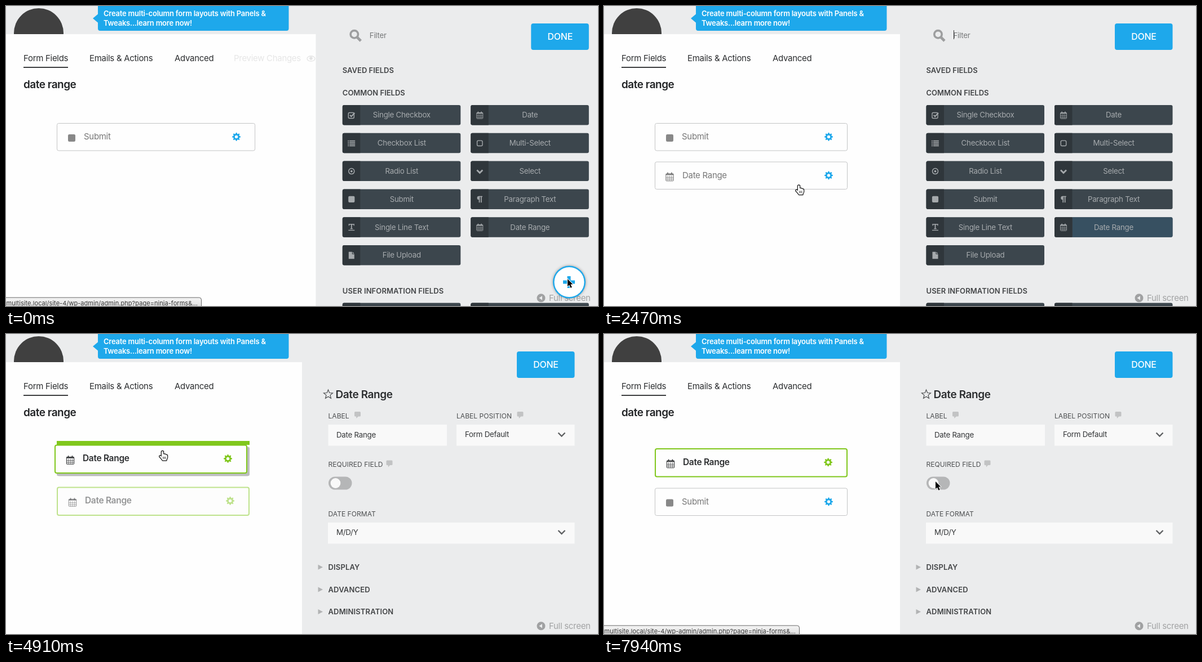
Recreate the animation shown at these times as an HTML page with a canvas. Size 1050 by 533 pixels, loop 8 s.

```html
<!DOCTYPE html>
<html lang="en">
<head>
<meta charset="utf-8">
<title>Form builder</title>
<style>
html, body { margin: 0; width: 100%; height: 100%; overflow: hidden; background: #ebeced; }
canvas { display: block; width: 1050px; height: 533px; }
</style>
</head>
<body>
<canvas id="stage"></canvas>
<script>
const W = 1050, H = 533, LOOP = 8000;
const BLUE = '#1ea8eb', GREEN = '#80c71c', BG = '#ebeced', PAPER = '#fefefe', DARK = '#424446';
const FONT = 'Inter, Roboto, "Liberation Sans", sans-serif';
const canvas = document.getElementById('stage');
const ctx = canvas.getContext('2d');
const ratio = window.devicePixelRatio || 1;
canvas.width = W * ratio;
canvas.height = H * ratio;

// start, end, number of steps, x, y
const MOVES = [
  [470, 470, 1, 961, 403],
  [620, 970, 4, 850, 399],
  [1150, 1230, 2, 846, 397],
  [1590, 2260, 8, 345.5, 319],
  [2730, 3020, 4, 329, 312],
  [3800, 4010, 3, 280, 309],
  [4550, 4910, 5, 277.5, 208.5],
  [5000, 5120, 2, 282, 187],
  [5660, 5660, 1, 279, 190],
  [6320, 6770, 6, 394, 240],
  [6950, 7130, 3, 394, 233],
  [7850, 7940, 2, 588, 262]
];
const BUTTONS = [
  ['Single Checkbox', 'check', 'Date', 'calendar'],
  ['Checkbox List', 'list', 'Multi-Select', 'outline'],
  ['Radio List', 'radio', 'Select', 'chevron'],
  ['Submit', 'square', 'Paragraph Text', 'para'],
  ['Single Line Text', 'type', 'Date Range', 'calendar'],
  ['File Upload', 'file']
];
const HAND = new Path2D('M-1.6 9V1Q-1.6-.6 0-.6Q1.6-.6 1.6 1V5Q2.8 4.2 4.1 5.4Q5.6 4.8 6.4 6.2Q8.6 5.9 8.6 8V11' +
  'Q8.4 13 7 14.6V16H.2Q-1 14-2.5 12.3L-5 9.6Q-5.6 8-4.1 7.8Q-2.8 8-1.6 9.6Z');
const ARROW = new Path2D('M0 0V13.2L3 10.5L5.4 15.8L7.8 14.8L5.4 9.6L9.4 9.4Z');

function text(str, x, y, size, color, weight = 400, gap = 0, align = 'left') {
  ctx.font = `${weight} ${size}px ${FONT}`;
  ctx.letterSpacing = gap + 'px';
  ctx.textAlign = align;
  ctx.fillStyle = color;
  ctx.fillText(str, x, y);
}
const body = (str, x, y, color, weight, size = 15) => text(str, x, y, size, color, weight, -.3);
const small = (str, x, y, color, align) => text(str, x, y, 13.3, color, 400, -.25, align);

function rect(x, y, w, h, color) {
  ctx.fillStyle = color;
  ctx.fillRect(x, y, w, h);
}
function round(x, y, w, h, r, fill, stroke, line = 1) {
  ctx.beginPath();
  ctx.roundRect(x, y, w, h, r);
  paint(fill, stroke, line);
}
function disc(x, y, r, fill, stroke, line = 1) {
  ctx.beginPath();
  ctx.arc(x, y, r, 0, Math.PI * 2);
  paint(fill, stroke, line);
}
function paint(fill, stroke, line) {
  if (fill) { ctx.fillStyle = fill; ctx.fill(); }
  if (stroke) { ctx.strokeStyle = stroke; ctx.lineWidth = line; ctx.stroke(); }
}
function poly(pts, fill, stroke, line, open) {
  ctx.beginPath();
  pts.forEach(([x, y], i) => i ? ctx.lineTo(x, y) : ctx.moveTo(x, y));
  if (!open) ctx.closePath();
  paint(fill, stroke, line);
}
function at(x, y, draw) {
  ctx.save();
  ctx.translate(x, y);
  draw();
  ctx.restore();
}
function fade(alpha, draw) {
  ctx.save();
  ctx.globalAlpha = alpha;
  draw();
  ctx.restore();
}

const ICONS = {
  check(c) {
    round(-5.5, -4.5, 10, 10, 2, null, c, 1.4);
    poly([[-2.8, -.2], [-.4, 2.2], [5.6, -4]], null, c, 2, true);
  },
  calendar(c) {
    round(-5.5, -4.5, 11, 10.5, 1, null, c, .9);
    rect(-5.5, -4.5, 11, 1.8, c);
    for (let i = -1; i < 2; i++) rect(i * 2.75 - .3, -2, .6, 8, c);
    for (let i = 0; i < 2; i++) rect(-5.5, .4 + i * 2.7, 11, .6, c);
    rect(-3.6, -6.5, 1.5, 3, c);
    rect(2.1, -6.5, 1.5, 3, c);
  },
  list(c) {
    for (let i = 0; i < 4; i++) {
      rect(-6.5, -5 + i * 2.9, 1.8, 1.7, c);
      rect(-3.6, -5 + i * 2.9, 10, 1.7, c);
    }
  },
  outline(c) { round(-4.7, -4.7, 9.4, 9.4, 2, null, c, 1.4); },
  radio(c) {
    disc(0, 0, 5, null, c, 1.5);
    disc(0, 0, 1.9, c);
  },
  chevron(c) { poly([[-5, -2], [0, 3], [5, -2]], null, c, 2.8, true); },
  square(c) { round(-5.6, -5.6, 11.2, 11.2, 2, c); },
  para(c) {
    ctx.beginPath();
    ctx.arc(-1.5, -2.4, 3.2, Math.PI / 2, Math.PI * 1.5);
    ctx.closePath();
    paint(c);
    rect(-1.6, -5.6, 6.4, 1.4, c);
    rect(-1.6, -5.6, 1.7, 11.4, c);
    rect(1.8, -5.6, 1.7, 11.4, c);
  },
  type(c) {
    rect(-5, -6, 10, 1.5, c);
    rect(-5, -6, 1.2, 3.2, c);
    rect(3.8, -6, 1.2, 3.2, c);
    rect(-.9, -6, 1.8, 9, c);
    rect(-2.4, 2, 4.8, 1.1, c);
    rect(-5.5, 4.6, 11, 1.3, c);
  },
  file(c) {
    poly([[-5, -6.3], [1, -6.3], [1, -2], [5, -2], [5, 6.3], [-5, 6.3]], c);
    poly([[2, -6.3], [5, -3], [2, -3]], c);
  }
};
function icon(name, x, y, color, scale = 1) {
  at(x, y, () => { ctx.scale(scale, scale); ICONS[name](color); });
}

// One path, so that it stays even when drawn half transparent.
function gear(x, y, color) {
  ctx.beginPath();
  for (let i = 0; i < 32; i++) {
    const r = i % 4 < 2 ? 7.5 : 5.5;
    const a = (i - .5) * Math.PI / 16;
    ctx.lineTo(x + r * Math.cos(a), y + r * Math.sin(a));
  }
  ctx.closePath();
  ctx.moveTo(x + 2.7, y);
  ctx.arc(x, y, 2.7, 0, Math.PI * 2);
  ctx.fillStyle = color;
  ctx.fill('evenodd');
}

function header() {
  ctx.save();
  ctx.beginPath();
  ctx.rect(0, 0, W, 50);
  ctx.clip();
  disc(58, 48, 44, '#404040');
  ctx.restore();
  round(163, -6, 338.5, 50, 4, BLUE);
  poly([[154, 22], [163.5, 14], [163.5, 30]], BLUE);
  text('Create multi-column form layouts with Panels &', 173, 18, 13, '#fff', 600, -.22);
  text('Tweaks...learn more now!', 173, 35, 13, '#fff', 600, -.22);
}

function tabs(t) {
  body('Form Fields', 31, 98, '#2c2e30');
  body('Emails & Actions', 148, 98, '#2c2e30');
  body('Advanced', 299, 98, '#2c2e30');
  rect(31, 108, 79, 2, '#3c3e40');
  if (t < 120) {
    body('Preview Changes', 404, 98, '#e6e6e6');
    ctx.beginPath();
    ctx.ellipse(541, 93.5, 7, 4.5, 0, 0, Math.PI * 2);
    paint(null, '#e3e3e3', 1.3);
    disc(541, 93, 2.8, '#e3e3e3');
  }
  text('date range', 31, 146, 19, '#222426', 600, -.5);
}

function field(name, y, right, opt = {}) {
  const { x = 90, on = false, shadow = false } = opt;
  const w = right - 90;
  const h = on ? 51.5 : 49.5;
  if (shadow) round(x + 4, y + 4, w, h, 3, '#bcbdbe');
  const line = on ? 2 : 1;
  round(x + line / 2, y + line / 2, w - line, h - line, 3, PAPER, on ? GREEN : '#c3c4c5', line);
  const dx = on ? 1.5 : 0, dy = on ? .5 : 0;
  if (name === 'Submit') icon('square', x + 26.5, y + 26.5, '#888', 1.16);
  else icon('calendar', x + 26.5 + dx, y + 27 + dy, on ? '#3a3c3e' : '#777', 1.2);
  const tx = x + (name === 'Submit' ? 48 : 49) + dx * .6;
  body(name, tx, y + 29.2 + dy, on ? '#2b2d2f' : '#777', on ? 600 : 400, on ? 15.5 : 15);
  gear(x + w - 33.5 - dx * .6, y + 24.4 + dy, on ? GREEN : BLUE);
}

function fields(t, right, hot) {
  const picked = { on: true };
  if (t < 3470) {
    field('Submit', 208, right);
    if (t >= 1690) field('Date Range', 276.5, right);
  } else if (t < 4550) {
    field('Submit', 208, right);
    field('Date Range', 276.5, right, picked);
  } else if (t < 5660) {
    const above = hot.y < 235;
    rect(90, above ? 190 : 334, 342, 7, GREEN);
    field('Submit', above ? 203 : 208, right);
    fade(.5, () => field('Date Range', above ? 271.5 : 276.5, right, picked));
    field('Date Range', hot.y - 12, right, { on: true, shadow: true, x: hot.x - 191.5 });
  } else {
    field('Date Range', 203, right, picked);
    field('Submit', 273.5, right);
  }
}

function done() {
  round(906, 31, 102.5, 47, 4, BLUE);
  text('DONE', 957.5, 60, 16, '#fff', 500, -.3, 'center');
}

function glow(t) {
  if (t < 1410 || t >= 3020) return 0;
  return t < 2470 ? 1 - .15 * (t - 1410) / 1060 : t < 2730 ? .8 : .25;
}

function button(x, y, label, glyph, lit) {
  round(x, y, 209.5, 35.5, 3, '#3c464d');
  if (lit) fade(lit, () => round(x + 32, y, 177.5, 35.5, [0, 3, 3, 0], '#365367'));
  round(x, y, 31.5, 35.5, [3, 0, 0, 3], '#2f363b');
  if (!label) return;
  icon(glyph, x + 16, y + 18, '#a5a9ac');
  small(label, x + 105, y + 22.3, '#a7abae', 'center');
}

function picker(t) {
  disc(592.5, 50.3, 6.7, null, '#9d9e9f', 3.6);
  poly([[597.5, 55.5], [604, 62]], null, '#9d9e9f', 4.6, true);
  small('Filter', 619.5, 56.5, '#77797a');
  const caret = t >= 120 && t < 620 || t >= 1150 && t < 1640 || t >= 2140 && t < 2730 || t >= 3200;
  if (caret) rect(620, 43, 1, 16, '#333');
  text('SAVED FIELDS', 571.5, 119.3, 13, DARK, 600);
  text('COMMON FIELDS', 571.5, 159, 13, DARK, 600);
  text('USER INFORMATION FIELDS', 571.5, 510.5, 13, DARK, 600, .1);
  BUTTONS.forEach(([a, ai, b, bi], i) => {
    const y = 176 + i * 49.8;
    button(571.5, y, a, ai, 0);
    if (b) button(799, y, b, bi, i === 4 ? glow(t) : 0);
  });
  button(571.5, 527.5);
  button(799, 527.5);
}

function hint(x, y) {
  round(x, y, 11, 8.5, 1.5, '#c2c3c4');
  poly([[x + 3, y + 8], [x + 7, y + 8], [x + 3.5, y + 12]], '#c2c3c4');
}

function star(x, y) {
  const pts = Array.from({ length: 10 }, (_, i) => {
    const r = i % 2 ? 3.7 : 8.4, a = i * Math.PI / 5 - Math.PI / 2;
    return [x + r * Math.cos(a), y + r * Math.sin(a)];
  });
  poly(pts, null, '#4a4c4e', 1.2);
}

function settings(t) {
  const paper = t < 3650 ? '#fdfdfd' : '#f9f9f9';
  star(571.5, 107.5);
  text('Date Range', 584.5, 113.5, 19, '#2b2d2f', 600, -.4);
  [['LABEL', 571.5, 149.5], ['LABEL POSITION', 799, 149.5],
   ['REQUIRED FIELD', 571.5, 236], ['DATE FORMAT', 571.5, 323.5]]
    .forEach(([s, x, y]) => text(s, x, y, 12.1, '#4d4f51'));
  hint(618, 138);
  hint(906.5, 138);
  hint(674.5, 224.5);
  rect(571.5, 161, 210.5, 37.5, paper);
  rect(799, 161, 209.5, 37.5, paper);
  rect(571, 335, 437.5, 37.5, paper);
  small('Date Range', 586, 184.3, '#333537');
  small('Form Default', 814, 183.3, '#333537');
  small('M/D/Y', 586, 357, '#333537');
  for (const y of [178.5, 352]) poly([[979.5, y - 3], [985.5, y + 3], [991.5, y - 3]], null, '#5e6062', 2.4, true);
  round(572, 253.5, 41.5, 23, 11.5, '#b5b6b7');
  disc(584.5, 265, 8.9, '#f9f9f9');
  ['DISPLAY', 'ADVANCED', 'ADMINISTRATION'].forEach((s, i) => {
    const y = 414.3 + i * 39.6;
    poly([[553.5, y - 4.5], [562, y], [553.5, y + 4.5]], '#b2b3b4');
    text(s, 571.5, y + 4.9, 13, DARK, 600, .15);
  });
}

function corner(t) {
  disc(949, 518.8, 7.5, '#a0a1a2');
  poly([[945.5, 518.8], [951, 515], [951, 522.6]], BG);
  body('Full screen', 963, 523.7, '#a2a3a4');
  if (t >= 120) return;
  ctx.save();
  ctx.shadowColor = 'rgba(0,0,0,.35)';
  ctx.shadowBlur = 5;
  disc(999, 490.5, 29, BLUE);
  ctx.restore();
  disc(999, 490.5, 26.5, '#fff');
  rect(988, 487.5, 21, 6, BLUE);
  rect(995.5, 480, 6, 21, BLUE);
}

function status(t) {
  let alpha = 0;
  if (t < 470) alpha = 1;
  else if (t < 970) alpha = Math.max(0, 1 - (t - 400) / 400);
  else if (t >= 6950) alpha = Math.min(1, .4 + (t - 6950) / 300);
  if (!alpha) return;
  fade(alpha, () => {
    const g = ctx.createLinearGradient(0, 518, 0, 533);
    g.addColorStop(0, '#f4f4f4');
    g.addColorStop(1, '#e2e2e2');
    round(-5, 518, 351.5, 30, 4, g, '#666');
    text('multisite.local/site-4/wp-admin/admin.php?page=ninja-forms&...', 340, 531.5, 11, '#3a3a3a', 400, .05, 'right');
  });
}

function pointer(t) {
  let x = 996, y = 485;
  for (const [from, to, n, ex, ey] of MOVES) {
    if (t < from) break;
    const step = n > 1 ? Math.floor((t - from) * (n - 1) / (to - from) + .05) + 1 : 1;
    const p = Math.min(1, step / n);
    x += (ex - x) * p;
    y += (ey - y) * p;
  }
  return { x, y };
}

function cursor(t, { x, y }) {
  let hand = x < 432 && (t < 5660 || y > 204);
  if (t >= 470 && t < 3470 && x > 571) hand = true;
  at(x, y, () => {
    ctx.lineJoin = 'round';
    const path = hand ? HAND : ARROW;
    ctx.lineWidth = hand ? 2.4 : 1.8;
    ctx.strokeStyle = hand ? '#111' : '#fff';
    ctx.fillStyle = hand ? '#fff' : '#000';
    ctx.stroke(path);
    ctx.fill(path);
    if (hand) for (let i = 0; i < 3; i++) rect(.8 + i * 2.1, 9.5, .9, 4, '#333');
  });
}

function draw(t) {
  const shift = t < 120 ? 25.3 : t < 320 ? 1 : 0;
  const hot = pointer(t);
  ctx.setTransform(ratio, 0, 0, ratio, 0, 0);
  rect(0, 0, W, H, BG);
  header();
  ctx.save();
  ctx.beginPath();
  ctx.rect(0, 50, 525 + shift * .97, H);
  ctx.clip();
  rect(0, 50, W, H, PAPER);
  tabs(t);
  fields(t, 432 + shift * .4, hot);
  ctx.restore();
  at(shift, 0, () => {
    done();
    if (t < 3470) picker(t);
    else settings(t);
  });
  corner(t);
  status(t);
  cursor(t, hot);
}

const start = performance.now();
function tick(now) {
  draw(Math.max(0, now - start) % LOOP);
  requestAnimationFrame(tick);
}
draw(0);
requestAnimationFrame(tick);
</script>
</body>
</html>
```
